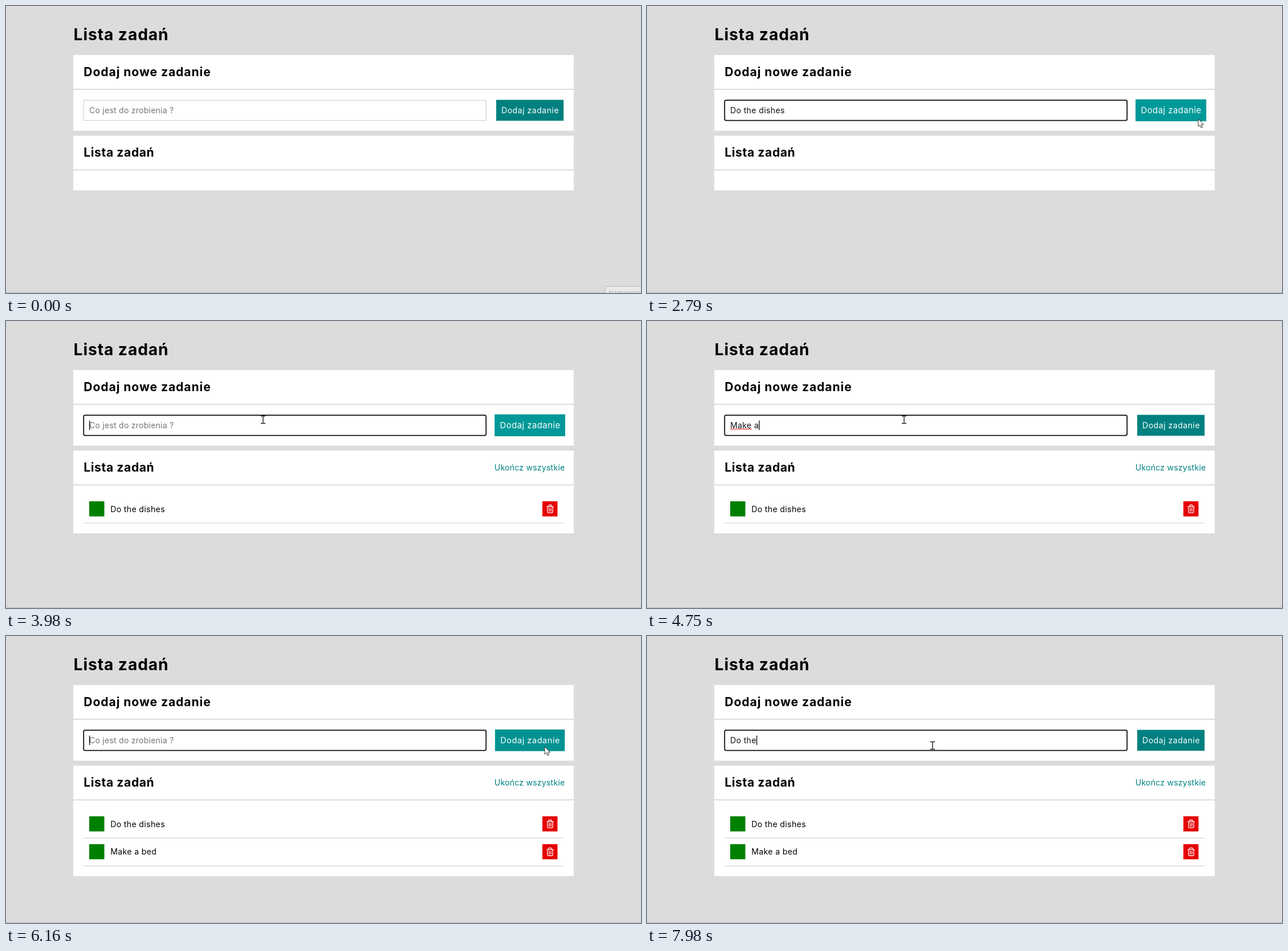
Write an HTML page that moves like this. It is 1114 px wide and 503 px high and loops after 8000 ms.

```html
<!DOCTYPE html>
<html lang="pl">
<head>
<meta charset="utf-8">
<title>Lista zadań</title>
<style>
  html, body { margin: 0; width: 100%; height: 100%; overflow: hidden; background: #dcdcdc; }
  svg { display: block; width: 1114px; height: 503px; }
  text { font: 14.1px Inter, "Open Sans", sans-serif; letter-spacing: .025em; white-space: pre; }
  .h1 { font-size: 28.2px; font-weight: 700; letter-spacing: .032em; }
  .h2 { font-size: 21.1px; font-weight: 700; letter-spacing: .044em; }
  .h2.tight { letter-spacing: .028em; }
  .tight { letter-spacing: .015em; }
</style>
</head>
<body>
<svg viewBox="0 0 1114 503">
  <defs>
    <g id="row">
      <rect x="146" y="316" width="26.5" height="26.5" fill="green"/>
      <rect x="941" y="316" width="26.5" height="26.5" fill="#e60000"/>
      <path d="M948.8 325.3h11.6M952 325v-1.2q0-1.3 1.3-1.3h2.6q1.3 0 1.3 1.3v1.2M950 325.6v9q0 1.6 1.6 1.6h6q1.6 0 1.6-1.6v-9M953.2 328v5.5M956 328v5.5" fill="none" stroke="#fff" stroke-width="1.3" stroke-linecap="round" stroke-linejoin="round"/>
      <path d="M136 354.2H978" stroke="#dcdcdc" stroke-width="1.6"/>
    </g>
  </defs>

  <rect width="1114" height="503" fill="#dcdcdc"/>
  <path d="M0 502.5H1114" stroke="#b9b9b9"/>
  <g id="tip">
    <rect x="1051.5" y="491.5" width="70" height="20" fill="#e9e9e9" stroke="#b9b9b9"/>
    <text x="1057" y="507" style="font-size:11px" fill="#aaa">Nagrywanie</text>
  </g>

  <text class="h1" x="118.6" y="60">Lista zadań</text>
  <rect x="118" y="86" width="878" height="132.5" fill="#fff"/>
  <path d="M118 146H996" stroke="#dcdcdc" stroke-width="2"/>
  <text class="h2" x="136.3" y="123">Dodaj nowe zadanie</text>

  <rect id="field" x="136.2" y="165.2" width="706" height="35.4" fill="#fff"/>
  <text id="typed" x="146" y="187.5"></text>
  <path id="wave" fill="none" stroke="#e33" stroke-width="1.1"/>
  <rect id="caret" y="174.5" width="1.3" height="16.5"/>
  <g id="button">
    <rect x="860" y="164.5" width="118.2" height="36.6"/>
    <text x="919.6" y="187.5" text-anchor="middle" fill="#fff" style="letter-spacing:.035em">Dodaj zadanie</text>
  </g>

  <rect id="list" x="118" y="227.3" width="878" fill="#fff"/>
  <path d="M118 287.3H996" stroke="#dcdcdc" stroke-width="2"/>
  <text class="h2 tight" x="136.3" y="264">Lista zadań</text>
  <text id="finish" class="tight" x="856.7" y="262" fill="teal">Ukończ wszystkie</text>
  <g id="row1"><use href="#row"/><text x="183.2" y="334.5">Do the dishes</text></g>
  <g id="row2" transform="translate(0 48.8)"><use href="#row"/><text x="183.2" y="334.5">Make a bed</text></g>

  <path id="arrow" d="M0 0V13.4L3.1 10.6L5.3 15.6L7.5 14.6L5.4 9.8H9.6Z" fill="#fff" stroke="#222" stroke-width=".9" stroke-linejoin="round"/>
  <path id="beam" d="M-4 -6.5H-1.2L0 -5.8L1.2 -6.5H4M0 -5.8V5.8M-4 6.5H-1.2L0 5.8L1.2 6.5H4" fill="none" stroke="#111" stroke-width="1.3"/>
</svg>
<script>
const LOOP = 8000, FOCUS = 960, TEXT_X = 146;
const $ = id => document.getElementById(id);
const set = (el, attrs) => { for (const k in attrs) el.setAttribute(k, attrs[k]); };
const show = (el, on) => set(el, { visibility: on ? 'visible' : 'hidden' });
const clamp = p => Math.min(1, Math.max(0, p));
const smooth = p => p * p * (3 - 2 * p);

// One key every "gap" ms; "wave" is the word marked by the spell checker
const entries = [
  { text: 'Do the dishes', start: 1150, gap: 82, end: 3560, wave: 'dishes', waveAt: 3000 },
  { text: 'Make a bed', start: 4260, gap: 95, end: 6090, wave: 'Make', waveAt: 4640 },
  { text: 'Do the', start: 7490, gap: 96, end: LOOP }
];
const hovers = [[2350, 3930], [5870, 6590]];

const origin = [1062, 470];
const moves = [
  { from: 140, to: 900, x: 344, y: 197 },
  { from: 2120, to: 2460, x: 978, y: 199 },
  { from: 2510, to: 2790, x: 967, y: 198 },
  { from: 3840, to: 3980, x: 451, y: 173 },
  { from: 5120, to: 5520, x: 1058, y: 234 },
  { from: 5520, to: 5660, x: 1023, y: 200 },
  { from: 5660, to: 6160, x: 945, y: 194 },
  { from: 6440, to: 6760, x: 925, y: 241 },
  { from: 6760, to: 7490, x: 501, y: 192 }
];

function drawPointer(t) {
  let [x, y] = origin;
  for (const m of moves) {
    const p = smooth(clamp((t - m.from) / (m.to - m.from)));
    x += (m.x - x) * p;
    y += (m.y - y) * p;
  }
  const inField = x > 136 && x < 842 && y > 165 && y < 201;
  for (const [id, on] of [['arrow', !inField], ['beam', inField]]) {
    show($(id), on && t >= moves[0].from);
    set($(id), { transform: `translate(${x} ${y})` });
  }
}

function drawWave(entry, t) {
  const on = entry && t >= entry.waveAt;
  show($('wave'), on);
  if (!on) return;
  const typed = $('typed'), from = entry.text.indexOf(entry.wave);
  const left = from ? typed.getSubStringLength(0, from) : 0;
  const width = typed.getSubStringLength(from, entry.wave.length);
  let d = `M${TEXT_X + left} 190.4`;
  for (let i = 0; i < width / 2; i++) d += `l2 ${i % 2 ? 1.7 : -1.7}`;
  set($('wave'), { d });
}

function drawField(t) {
  const focused = t >= FOCUS;
  set($('field'), focused
    ? { rx: 2.5, stroke: '#101010', 'stroke-width': 1.8 }
    : { rx: 0, stroke: '#d3d3d3', 'stroke-width': 1.2 });

  const entry = entries.find(e => t >= e.start && t < e.end);
  const count = entry ? Math.min(entry.text.length, 1 + Math.floor((t - entry.start) / entry.gap)) : 0;
  const typed = $('typed');
  typed.textContent = count ? entry.text.slice(0, count) : 'Co jest do zrobienia ?';
  set(typed, { fill: count ? '#111' : '#757575', class: count ? '' : 'tight' });

  // The caret restarts its blink after each key and each added task
  const lastKey = count
    ? entry.start + (count - 1) * entry.gap
    : Math.max(FOCUS, ...entries.map(e => e.end).filter(end => end <= t));
  show($('caret'), focused && (t - lastKey) % 1000 < 500);
  set($('caret'), { x: TEXT_X + (count ? typed.getComputedTextLength() : 0) });
  drawWave(entry, t);
}

function drawButton(t) {
  const ramp = at => smooth(clamp((t - at) / 450));
  const hover = hovers.reduce((sum, [enter, leave]) => sum + ramp(enter) - ramp(leave), 0);
  const c = 128 + 25 * hover;
  set($('button'), {
    fill: `rgb(0 ${c} ${c})`,
    transform: `translate(919.1 182.8) scale(${1 + .05 * hover}) translate(-919.1 -182.8)`
  });
}

function drawList(t) {
  const n = entries.filter(e => t >= e.end).length;
  set($('list'), { height: 95.8 + 48.9 * n });
  show($('finish'), n > 0);
  show($('row1'), n > 0);
  show($('row2'), n > 1);
}

function draw(t) {
  set($('tip'), { opacity: 1 - clamp((t - 60) / 100) });
  drawField(t);
  drawButton(t);
  drawList(t);
  drawPointer(t);
}

const start = performance.now();
function frame(now) {
  draw(Math.max(0, now - start) % LOOP);
  requestAnimationFrame(frame);
}
draw(0);
requestAnimationFrame(frame);
</script>
</body>
</html>
```
